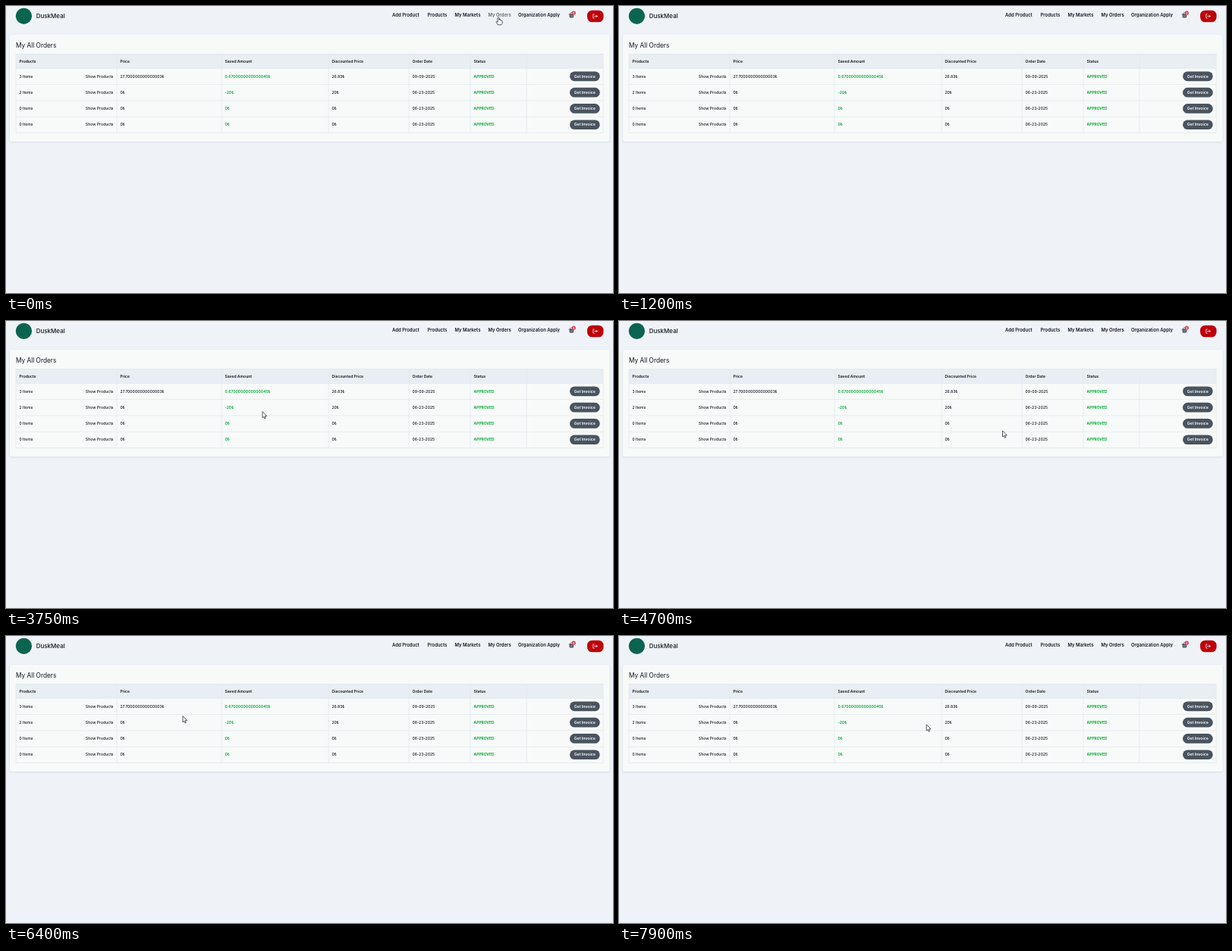
These frames come from a looping animation (800 px wide and 379 px high, 8 s). An HTML page with a canvas:

```html
<!DOCTYPE html>
<html lang="en">
<head>
<meta charset="utf-8">
<title>My All Orders</title>
<style>
html, body { margin: 0; width: 100%; height: 100%; overflow: hidden; background: #eff3f8; }
canvas { display: block; width: 800px; height: 379px; }
</style>
</head>
<body>
<canvas id="stage"></canvas>
<script>
const W = 800, H = 379, LOOP = 8000, STEP = 50;
const canvas = document.getElementById('stage');
const ctx = canvas.getContext('2d');
const dpr = window.devicePixelRatio || 1;
canvas.width = W * dpr;
canvas.height = H * dpr;

const INK = '#14181f', GREEN = '#08a935', LINE = '#e1e7ed';
const COLS = [13, 146, 284, 425, 531, 612, 686, 787];
const HEADS = ['Products', 'Price', 'Saved Amount', 'Discounted Price', 'Order Date', 'Status'];
const ROWS = [
  ['3 Items', '27.700000000000003₺', '0.6700000000000045₺', '26.83₺', '09-09-2025'],
  ['2 Items', '0₺', '-20₺', '20₺', '06-23-2025'],
  ['0 Items', '0₺', '0₺', '0₺', '06-23-2025'],
  ['0 Items', '0₺', '0₺', '0₺', '06-23-2025']
];
const NAV = [['Add Product', 509], ['Products', 555.5], ['My Markets', 591.5],
  ['My Orders', 635.5], ['Organization Apply', 675]];

// Pointer keys: time, x, y
const VISITS = [
  [[0, 649, 15], [100, 649, 15], [350, 680, 21], [600, 722, 24.5], [850, 774, 30], [1050, 788, 38], [1150, 788, 38]],
  [[2900, 773, 72], [3050, 771, 60], [3450, 771, 60], [3750, 338, 120], [4250, 338, 120],
   [4450, 511, 145], [4600, 511, 145], [4900, 490, 146], [5450, 490, 146], [5600, 347.5, 100],
   [5850, 347.5, 100], [6200, 233, 106], [6650, 233, 106], [6850, 229.5, 102], [7450, 229.5, 102],
   [7850, 405.2, 117.3], [8000, 405.2, 117.3]]
];

const ease = p => p * p * (3 - 2 * p);
const clamp = p => Math.max(0, Math.min(1, p));

function pointerAt(t) {
  for (const keys of VISITS) {
    if (t < keys[0][0] || t > keys[keys.length - 1][0]) continue;
    const i = Math.max(1, keys.findIndex(k => k[0] >= t));
    const [t0, x0, y0] = keys[i - 1], [t1, x1, y1] = keys[i];
    const p = ease(clamp((t - t0) / (t1 - t0)));
    return [x0 + (x1 - x0) * p, y0 + (y1 - y0) * p];
  }
  return null;
}

function text(str, x, y, size, weight, color = INK, align = 'left') {
  ctx.font = `${weight} ${size}px Inter, "Open Sans", sans-serif`;
  ctx.fillStyle = color;
  ctx.textAlign = align;
  ctx.textBaseline = 'alphabetic';
  ctx.fillText(str, x, y);
}

function box(x, y, w, h, r, color) {
  ctx.fillStyle = color;
  ctx.beginPath();
  ctx.roundRect(x, y, w, h, r);
  ctx.fill();
}

function disc(x, y, r, color) {
  ctx.fillStyle = color;
  ctx.beginPath();
  ctx.arc(x, y, r, 0, Math.PI * 2);
  ctx.fill();
}

function stroke(d, color, width) {
  ctx.strokeStyle = color;
  ctx.lineWidth = width;
  ctx.lineCap = ctx.lineJoin = 'round';
  ctx.stroke(new Path2D(d));
}

function drawHeader(t) {
  disc(23.5, 13.3, 10.6, '#0b6450');
  text('DuskMeal', 39.7, 16.4, 8, 500);
  const fade = Math.round(102 - 82 * clamp((t - 600) / 250));
  for (const [label, x] of NAV) {
    const color = label === 'My Orders' ? `rgb(${fade},${fade},${fade + 6})` : INK;
    text(label, x, 14, 5.95, 600, color);
  }
  box(742.6, 11, 5.4, 4.6, 1, '#3d434c');
  stroke('M741.9 11H748.6M743.3 10.8L744.6 8.8M747.3 10.8L746 8.8', '#3d434c', .8);
  stroke('M744 12.4V14.2M745.3 12.4V14.2M746.6 12.4V14.2', '#e8ebf0', .45);
  disc(748.2, 9.2, 2.6, '#d94350');
  text('3', 748.2, 10.5, 3.5, 600, '#fff', 'center');

  box(766, 5.7, 21.5, 15.6, 6.5, '#bd0009');
  stroke('M775.2 10.8H773.8V16.1H775.2M775.6 13.45H779.2M777.7 11.9L779.2 13.45L777.7 15', '#fff', .75);
}

function drawTable() {
  ctx.save();
  ctx.shadowColor = 'rgba(30,45,65,.13)';
  ctx.shadowBlur = 2.5 * dpr;
  ctx.shadowOffsetY = .7 * dpr;
  box(5, 38, 790.5, 141, 2.5, '#f7faf9');
  ctx.restore();
  text('My All Orders', 13, 55, 8.3, 400);

  box(13, 63.3, 774, 18.9, 0, '#e9eef3');
  ctx.fillStyle = LINE;
  for (const x of COLS) ctx.fillRect(x - .3, 63.3, .7, 104.2);
  for (const y of [63, 82, 103.3, 124.6, 145.9, 167.2]) ctx.fillRect(13, y, 774, .7);
  HEADS.forEach((label, i) => text(label, COLS[i] + 4.5, 74.8, 5.05, 600));

  ROWS.forEach((row, r) => {
    const y = 94.5 + r * 21.3;
    row.forEach((value, i) => {
      const saved = i === 2;
      text(value, COLS[i] + 4.5, y, 5.05, saved ? 600 : 500, saved ? GREEN : INK);
    });
    text('Show Products', 141.6, y, 5.1, 500, INK, 'right');
    text('APPROVED', 616.6, y, 4.9, 700, GREEN);
    box(743, y - 8, 39.7, 12.7, 6.35, '#4a5460');
    text('Get Invoice', 762.8, y, 5.2, 600, '#fff', 'center');
  });
}

function drawPointer(t) {
  const at = pointerAt(t);
  if (!at) return;
  const hand = at[1] < 18 && at[0] < 665;
  const shape = new Path2D(hand
    ? 'M-1 .7Q0-.6 1 .7V3.5Q2-.2 2.6 3.8Q4 3.2 4 4.4Q5.2 4 5.2 5.2V7Q5 8.5 4 9.8H-.8L-3.1 6.2Q-3.2 4.7-1 6Z'
    : 'M0 0V7.8L1.8 6.2L3 9L4.3 8.4L3.1 5.7H5.4Z');
  ctx.save();
  ctx.translate(at[0], at[1]);
  ctx.fillStyle = '#fff';
  ctx.fill(shape);
  ctx.strokeStyle = '#20242a';
  ctx.lineWidth = .75;
  ctx.lineJoin = 'round';
  ctx.stroke(shape);
  ctx.restore();
}

function draw(now) {
  const t = Math.floor((now % LOOP) / STEP) * STEP;
  ctx.setTransform(dpr, 0, 0, dpr, 0, 0);
  ctx.fillStyle = '#eff3f8';
  ctx.fillRect(0, 0, W, H);
  drawHeader(t);
  drawTable();
  drawPointer(t);
}

let start;
function tick(now) {
  start ??= now;
  draw(now - start);
  requestAnimationFrame(tick);
}
draw(0);
requestAnimationFrame(tick);
</script>
</body>
</html>
```
